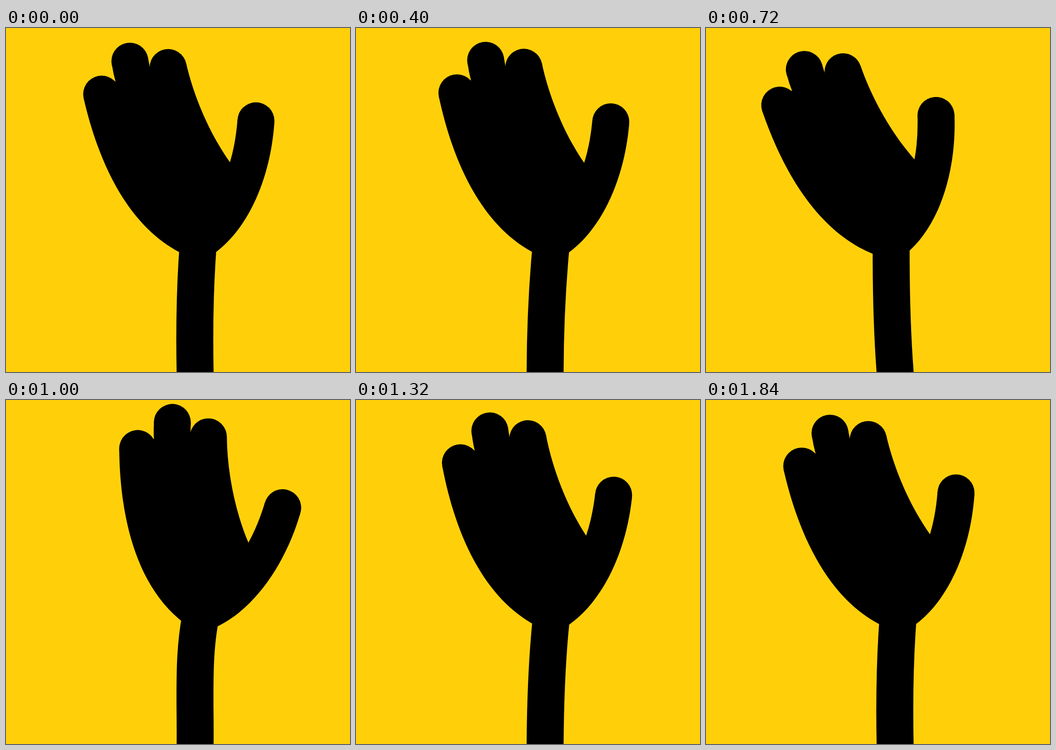
Recreate the animation shown at these times as an HTML page. Size 748 by 748 pixels, loop 2040 ms.

```html
<!DOCTYPE html>
<html lang="en">
<head>
<meta charset="utf-8">
<title>Waving hand</title>
<style>
  html, body { margin: 0; width: 100%; height: 100%; overflow: hidden; background: #ffd00a; }
  svg { display: block; width: 100%; height: 100%; }
</style>
</head>
<body>
<svg viewBox="0 0 748 748">
  <rect width="748" height="748" fill="#ffd00a"/>
  <path id="arm" fill="none" stroke="#000" stroke-width="80.4"/>
  <g id="hand">
    <path d="M168.9 153 L208 144 L238 116 Q233 98 230.2 79 L308.8 65 L312.5 84 L352.5 86 L391.8 77
      C408.5 150 443.5 231 487 292 Q499.5 250 503.4 199 L583.6 205
      C576 317 533 429 457 487 L433 504 L400 499 L376 487
      C255.5 423 197 275 168.9 153 Z"/>
    <circle cx="208" cy="143.8" r="40.2"/>
    <circle cx="269.4" cy="72.2" r="40.2"/>
    <circle cx="352.6" cy="86" r="40.2"/>
    <circle cx="543.5" cy="201.8" r="40.2"/>
  </g>
</svg>
<script>
const STEP = 40, LOOP = 2040, LAST = 46;
const BASE = [411.2, 748], WRIST = [420.5, 440];

// Six even swings, then a quicker decaying settle; times in steps, sizes in degrees.
const SWINGS = 6, SETTLES = 2, BEAT = 5.45, SETTLE_BEAT = 3.7;
const ARM = { first: 6.9, down: -3.3, up: 3.4, ends: 0.6, decay: 0.35 };
const HAND = { first: 8, down: -7.4, up: 13.1, ends: 0.58, decay: 0.45 };

const arm = document.getElementById('arm');
const hand = document.getElementById('hand');

function turnTime(part, i) {
  if (i < 0) return 0;
  const settles = Math.max(0, i - SWINGS + 1);
  return part.first + (i - settles) * BEAT + settles * SETTLE_BEAT;
}

function turnAngle(part, i) {
  if (i < 0 || i >= SWINGS + SETTLES) return 0;
  if (i >= SWINGS) return -part.decay * turnAngle(part, i - 1);
  const isEnd = i === 0 || i === SWINGS - 1;
  return (i % 2 ? part.up : part.down) * (isEnd ? part.ends : 1);
}

// Sine easing from one turning point to the next.
function swing(part, step) {
  let i = 0;
  while (turnTime(part, i) <= step) i++;
  const t0 = turnTime(part, i - 1), t1 = turnTime(part, i);
  const a0 = turnAngle(part, i - 1), a1 = turnAngle(part, i);
  return a0 + (a1 - a0) * (1 - Math.cos(Math.PI * (step - t0) / (t1 - t0))) / 2;
}

function rotate([x, y], [cx, cy], degrees) {
  const a = degrees * Math.PI / 180, c = Math.cos(a), s = Math.sin(a);
  const dx = x - cx, dy = y - cy;
  return [cx + dx * c - dy * s, cy + dx * s + dy * c];
}

function draw(time) {
  const step = Math.min(LAST, Math.floor((time % LOOP) / STEP));
  const armTurn = swing(ARM, step);
  const handTurn = swing(HAND, step);
  const wrist = rotate(WRIST, BASE, armTurn);
  const root = rotate([411.6, 770], BASE, armTurn);
  const lower = rotate([409.3, 648], BASE, armTurn);
  const upper = rotate([wrist[0] - 9.5, wrist[1] + 100], wrist, handTurn * 0.8);
  arm.setAttribute('d', `M${root} L${BASE} C${lower} ${upper} ${wrist}`);
  hand.setAttribute('transform',
    `translate(${wrist}) rotate(${handTurn}) translate(${-WRIST[0]} ${-WRIST[1]})`);
}

let start;
function tick(now) {
  start ??= now;
  draw(now - start);
  requestAnimationFrame(tick);
}
draw(0);
requestAnimationFrame(tick);
</script>
</body>
</html>
```
